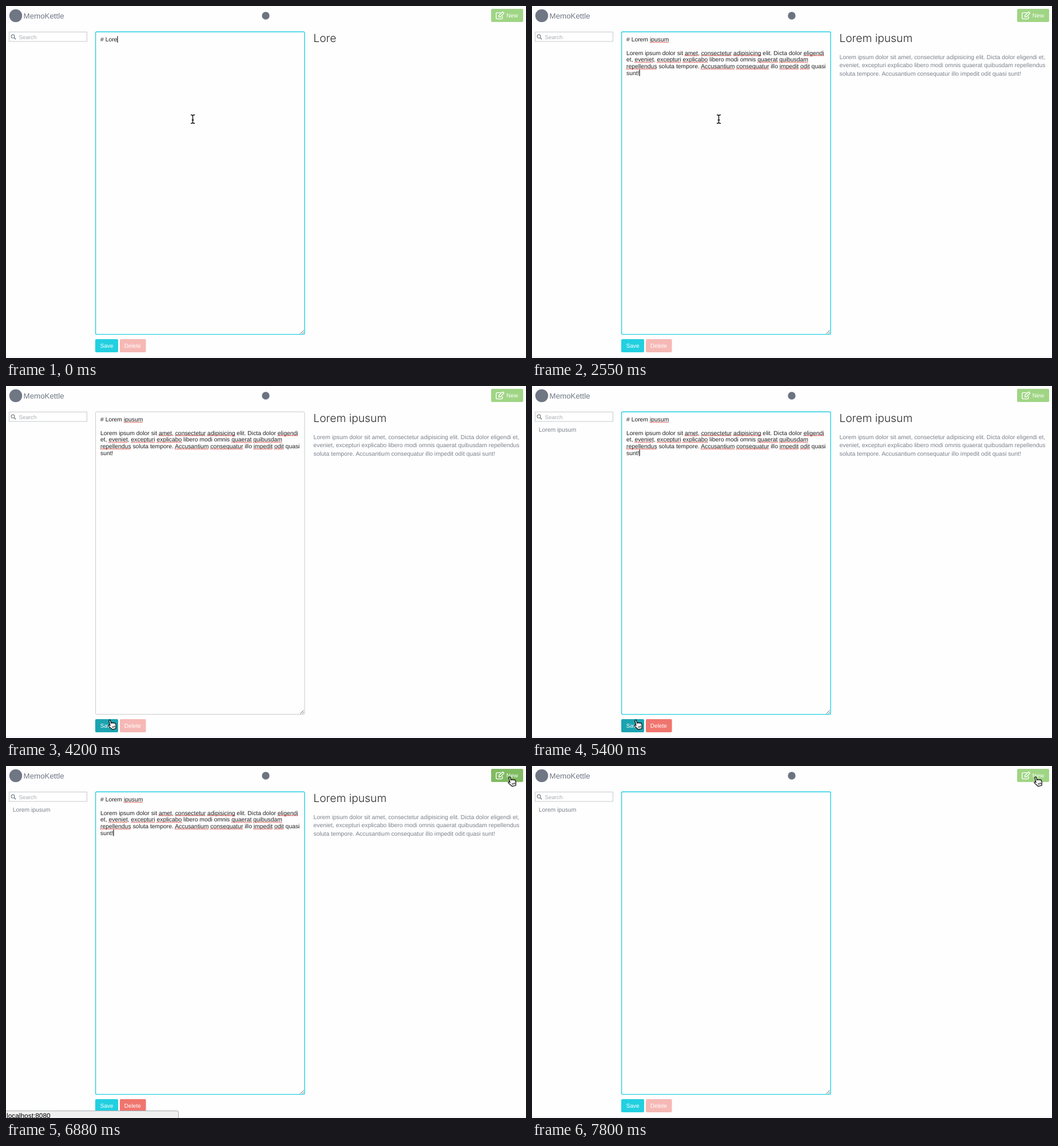
Animation, 909 px wide and 616 px high, one loop 8000 ms. Source, as an HTML page:

```html
<!DOCTYPE html>
<html lang="en">
<head>
<meta charset="utf-8">
<title>Markdown notes</title>
<style>
html, body { margin: 0; width: 100%; height: 100%; overflow: hidden; background: #f7f8fa; }
svg { display: block; width: 909px; height: 616px; }
text { font: 10.37px "Liberation Sans", Arial, sans-serif; white-space: pre; text-rendering: geometricPrecision; }
.btn { font-size: 10.05px; fill: #fff; }
.ink { fill: #222; }
.soft { fill: #7b818c; }
#title { font: 300 19.3px Inter, "Liberation Sans", sans-serif; fill: #2a2a2a; }
#marks path, #typo { stroke: #d8413a; stroke-width: 1.5; stroke-dasharray: 1.7 1.1; fill: none; }
</style>
</head>
<body>
<svg viewBox="0 0 909 616">
  <rect width="909" height="616" fill="#f7f8fa"/>
  <rect id="sheet" width="909" height="613" fill="#fefefe"/>

  <circle cx="17" cy="17" r="11.2" fill="#6f7684"/>
  <text x="30.6" y="21.5" style="font-size:13.3px" fill="#6f7684">MemoKettle</text>
  <circle cx="454" cy="17" r="6.7" fill="#6c7380"/>
  <g>
    <rect id="newBox" x="848" y="5" width="56" height="23" rx="2"/>
    <g fill="none" stroke="#fff" stroke-width="1.4" stroke-linejoin="round">
      <path d="M865 11.6h-6.2q-2 0-2 2v7q0 2 2 2h7q2 0 2-2v-2.4"/>
      <path d="M861.6 19.2v-2.6l6.6-6.4 2.4 2.4-6.5 6.6z"/>
    </g>
    <text class="btn" x="874.8" y="20.4">New</text>
  </g>

  <g id="app">
    <rect x="5.5" y="45.5" width="136" height="16.5" fill="#fff" stroke="#c6c9cd"/>
    <g fill="none" stroke="#8b9097" stroke-width="1.4">
      <circle cx="12" cy="53.2" r="2.9"/><path d="M14.2 55.4l3 3" stroke-width="1.8"/>
    </g>
    <text x="22.5" y="57.5" style="font-size:9.75px" fill="#aaadb2">Search</text>
    <text id="item" class="soft" x="11.7" y="79.8">Lorem ipusum</text>

    <rect id="box" x="156.6" y="45.2" width="365.4" height="529.4" rx="2" fill="#fefefe"/>
    <path d="M514.5 573.5l6-6M518 573.5l2.5-2.5" stroke="#666" fill="none"/>
    <text id="head" class="ink" x="165" y="62.2"></text>
    <path id="typo"/>
    <g id="body"></g>
    <g id="marks"></g>
    <rect id="caret" width="1.1" height="11.4" fill="#000"/>

    <text id="title" x="537.3" y="63.2"></text>
    <g id="view"></g>

    <rect id="save" x="156" y="583" width="40" height="23" rx="2"/>
    <text class="btn" x="164.8" y="597.7">Save</text>
    <g id="del">
      <rect x="199" y="583" width="45.6" height="23" rx="2" fill="#f0756e"/>
      <text class="btn" x="206.8" y="597.7">Delete</text>
    </g>
  </g>

  <g id="bar">
    <path d="M-1 603.5h300q2.500 0 2.500 2.500v12h-303z" fill="#f0f0f1" stroke="#a9abae"/>
    <text x="1" y="616" style="font-size:11.9px">localhost:8080</text>
  </g>

  <g id="beam" fill="none">
    <path id="beamEdge" d="M-3.500-7.500q3 0 3.500 1.500q.5-1.500 3.500-1.500M0-6V6M-3.500 7.500q3 0 3.500-1.500q.5 1.500 3.500 1.500M-1.800 1.500h3.600" stroke="#fff" stroke-width="2.600"/>
    <path d="M-3.500-7.500q3 0 3.500 1.500q.5-1.500 3.500-1.500M0-6V6M-3.500 7.500q3 0 3.500-1.500q.5 1.500 3.500 1.500M-1.800 1.500h3.600" stroke="#000" stroke-width="1.300"/>
  </g>
  <g id="hand">
    <g transform="rotate(-14)" stroke="#000" stroke-width="1.200" stroke-linejoin="round">
      <path fill="#fff" d="M-3.800-7.400c0-2 2.600-2 2.600 0v5c.3-1.300 2.500-1.200 2.600.3 .5-1 2.400-.7 2.500.7 .6-.8 2.300-.4 2.300 1.100v3.200c0 2-1.200 3-1.400 5.500h-6.800c-.3-2-3.200-4.600-4.600-7-.8-1.500 1-2.600 2.200-1.200l.6.700z"/>
      <path fill="none" d="M-.4 3v3M1.700 3v3M3.800 3v3" stroke-width=".9"/>
    </g>
  </g>
</svg>
<script>
const $ = id => document.getElementById(id);
const NS = 'http://www.w3.org/2000/svg';
const LOOP = 8000, LEFT = 165, LEAD = 11.7;
const CYAN = '#22d0e0', GREEN = '#a0d585';

const add = (parent, tag, attrs) => {
  const el = document.createElementNS(NS, tag);
  for (const k in attrs) el.setAttribute(k, attrs[k]);
  return parent.appendChild(el);
};
const show = (id, on) => { $(id).style.display = on ? '' : 'none'; };

const draft = [
  'Lorem ipsum dolor sit amet, consectetur adipisicing elit. Dicta dolor eligendi',
  'et, eveniet, excepturi explicabo libero modi omnis quaerat quibusdam',
  'repellendus soluta tempore. Accusantium consequatur illo impedit odit quasi',
  'sunt!'
];
const preview = [
  'Lorem ipsum dolor sit amet, consectetur adipisicing elit. Dicta dolor eligendi et,',
  'eveniet, excepturi explicabo libero modi omnis quaerat quibusdam repellendus',
  'soluta tempore. Accusantium consequatur illo impedit odit quasi sunt!'
];
const unknown = /amet|consectetur|adipisicing|eligendi|eveniet|excepturi|explicabo|quaerat|quibusdam|repellendus|Accusantium|consequatur|impedit|odit/g;

// Dashed underline beneath part of a text line
const underline = (el, from, len) => {
  const x = LEFT + el.getSubStringLength(0, from), y = +el.getAttribute('y') + 1.2;
  return `M${x} ${y}h${el.getSubStringLength(from, len)}`;
};

const lines = draft.map((s, i) => {
  const el = add($('body'), 'text', { x: LEFT, y: 62.2 + LEAD * (i + 2), class: 'ink' });
  el.textContent = s;
  for (const m of s.matchAll(unknown))
    add($('marks'), 'path', { d: underline(el, m.index, m[0].length) });
  return el;
});
preview.forEach((s, i) => {
  add($('view'), 'text', { x: 537.5, y: 92.6 + 14.55 * i, class: 'soft' }).textContent = s;
});

// Each step changes only the listed parts of the state; caret is a line number or -1
const steps = [
  [0, { text: '# Lore', caret: 0, typo: 0, body: 0, marks: 0, item: 0, app: 1, bar: 0,
        ring: CYAN, save: CYAN, del: 0.5, add: GREEN, mouse: ['beam', 326.5, 198] }],
  [150, { text: '# Lorem' }],
  [300, { text: '# Lorem ' }],
  [600, { text: '# Lorem i' }],
  ...[...'pusum'].map((c, i) => [900 + 150 * i, { text: '# Lorem i' + 'pusum'.slice(0, i + 1) }]),
  [1800, { caret: 1, typo: 1 }],
  [1950, { caret: 2 }],
  [2400, { caret: 5, body: 1 }],
  [2550, { marks: 1 }],
  [3000, { caret: -1 }],
  [3150, { mouse: ['beam', 320, 252] }],
  [3300, { mouse: ['beam', 303, 318] }],
  [3450, { mouse: ['beam', 286, 385], caret: 5 }],
  [3600, { mouse: ['beam', 221, 515] }],
  [3750, { mouse: ['beam', 195.5, 568] }],
  [3900, { mouse: ['hand', 185.5, 592.5], caret: -1 }],
  [4050, { save: '#1fb9c8' }],
  [4200, { save: '#1ba3b0', ring: '#c6c9cd' }],
  [4500, { ring: CYAN, caret: 5, item: 1, del: 1 }],
  [4950, { caret: -1 }],
  [5400, { caret: 5 }],
  [5850, { caret: -1 }],
  [6150, { mouse: ['beam', 290, 470], save: CYAN }],
  [6300, { mouse: ['none', 0, 0], caret: 5 }],
  [6730, { mouse: ['hand', 884.5, 27], add: '#8ecb70' }],
  [6880, { bar: 1, add: '#80bb62' }],
  [7170, { app: 0, add: GREEN }],
  [7320, { app: 1, text: '', typo: 0, body: 0, marks: 0, caret: -1, del: 0.5, ring: '#c6c9cd' }],
  [7470, { caret: 0, ring: CYAN, bar: 0 }],
  [7800, { caret: -1 }]
];

function draw(s) {
  $('head').textContent = s.text;
  $('title').textContent = s.text.slice(2).trimEnd();
  if (s.typo) $('typo').setAttribute('d', underline($('head'), 8, 6));
  show('typo', s.typo);
  show('body', s.body);
  show('view', s.body);
  show('marks', s.marks);
  show('item', s.item);
  show('app', s.app);
  show('bar', s.bar);
  $('sheet').setAttribute('height', s.app ? 613 : 51);
  $('box').setAttribute('stroke', s.ring);
  $('box').setAttribute('stroke-width', s.ring === CYAN ? 1.4 : 1);
  $('save').setAttribute('fill', s.save);
  $('newBox').setAttribute('fill', s.add);
  $('del').setAttribute('opacity', s.del);

  show('caret', s.caret >= 0);
  if (s.caret >= 0) {
    const row = s.caret === 0 ? $('head') : s.caret === 5 ? lines[3] : null;
    const width = row && row.textContent ? row.getComputedTextLength() : 0;
    $('caret').setAttribute('x', LEFT + width);
    $('caret').setAttribute('y', 52.7 + LEAD * s.caret);
  }
  const [kind, x, y] = s.mouse;
  for (const id of ['beam', 'hand']) {
    show(id, id === kind);
    $(id).setAttribute('transform', `translate(${x} ${y})`);
  }
}

let last = -1;
const start = performance.now();
function tick() {
  const t = (performance.now() - start) % LOOP;
  const past = steps.filter(([at]) => at <= t);
  if (past.length !== last) {
    last = past.length;
    draw(Object.assign({}, ...past.map(([, change]) => change)));
  }
  requestAnimationFrame(tick);
}
tick();
</script>
</body>
</html>
```
